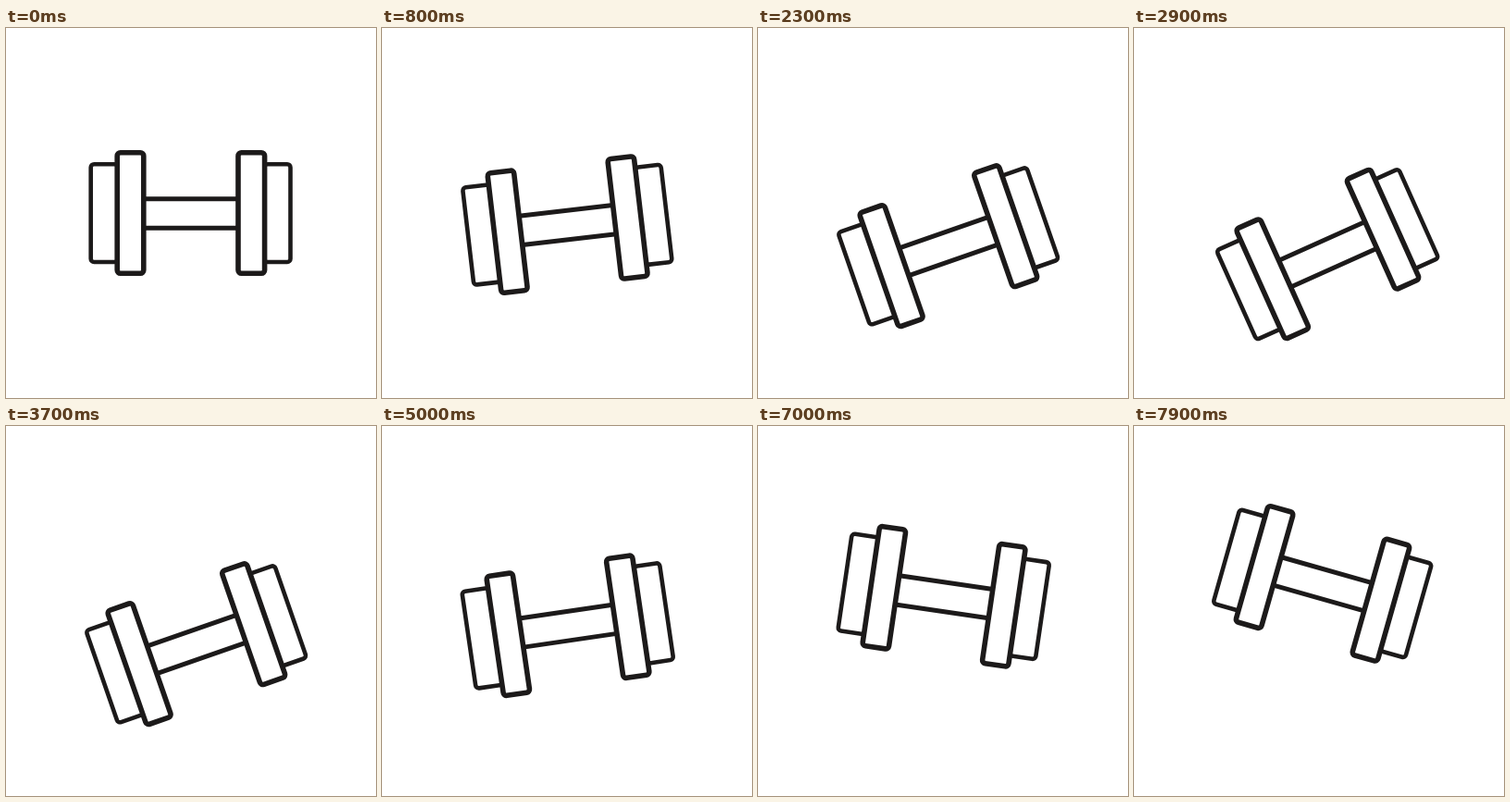
Recreate the animation shown at these times as an HTML page. Size 400 px wide and 400 px high, loop 8 s.

```html
<!DOCTYPE html>
<html>
<head>
<meta charset="utf-8">
<style>
  html, body { margin: 0; height: 100%; overflow: hidden; background: #fff; }
  svg { display: block; width: 100vw; height: 100vh; }
</style>
</head>
<body>
<svg viewBox="0 0 400 400">
  <g id="dumbbell" fill="#fff" stroke="#1c1a1a">
    <path d="M149 184.7H251M149 216.2H251" stroke-width="5"/>
    <g stroke-width="4.6">
      <rect x="91.7" y="147.2" width="29" height="105.8" rx="3.5"/>
      <rect x="279.3" y="147.2" width="28.2" height="105.8" rx="3.5"/>
    </g>
    <g stroke-width="5.6">
      <rect x="120.2" y="134.8" width="28.6" height="130.4" rx="3.5"/>
      <rect x="251" y="134.8" width="28.6" height="130.4" rx="3.5"/>
    </g>
  </g>
</svg>
<script>
  const LOOP = 8000, STEP = 100, PEAK = 3000, MAX_ANGLE = 25;
  const dumbbell = document.getElementById('dumbbell');
  const start = performance.now();

  // Swings at constant speed around the right end, turning back at the peak.
  function draw() {
    const elapsed = (performance.now() - start) % LOOP;
    const t = Math.floor(elapsed / STEP) * STEP;
    const angle = MAX_ANGLE * (Math.abs(t - PEAK) / PEAK - 1);
    dumbbell.setAttribute('transform', `rotate(${angle} 308.5 200)`);
    requestAnimationFrame(draw);
  }
  draw();
</script>
</body>
</html>
```
